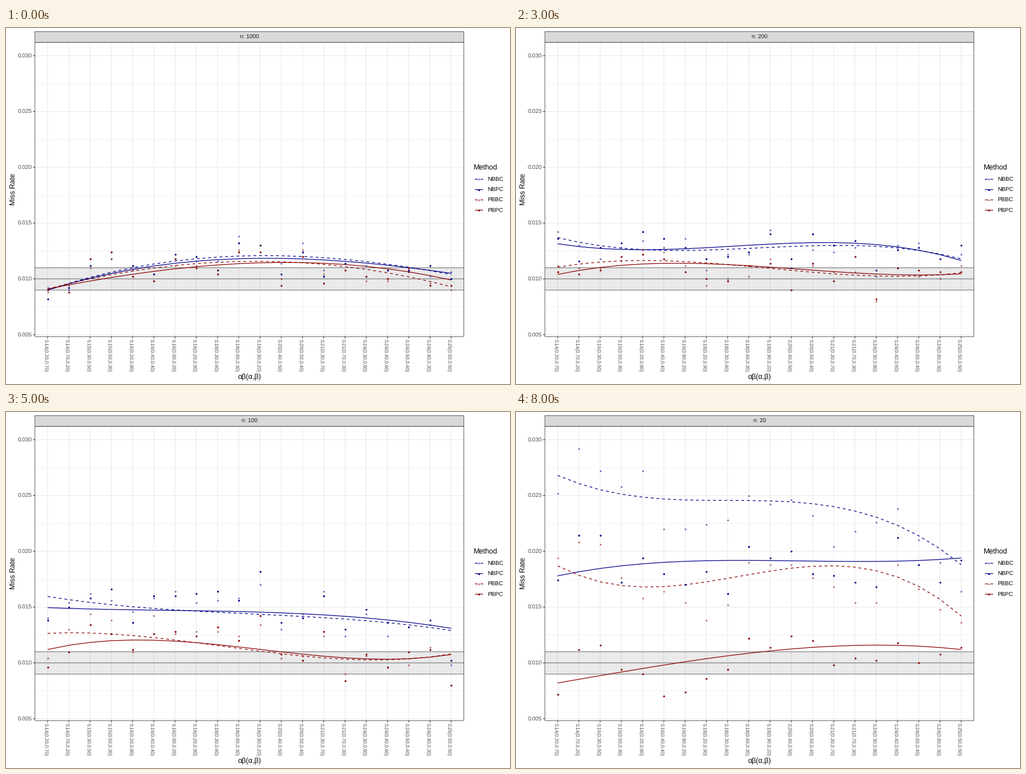
These frames come from a looping animation (890 by 629 pixels, 9000 ms). A matplotlib script:

```python
import numpy as np
import matplotlib.pyplot as plt
from matplotlib.animation import FuncAnimation
from matplotlib.patches import Rectangle

plt.rcParams.update({"font.family": "Liberation Sans", "path.snap": False,
                     "text.hinting": "none"})

W, H, DPI = 890, 629, 64
PT = 72 / DPI                                  # points per pixel
LEFT, RIGHT, TOP, BOTTOM = 51, 808.6, 25.3, 545.2
BLUE, RED = "#00008b", "#8b0000"
METHODS = ["NBBC", "NBPC", "PBBC", "PBPC"]
SIZES = [1000, 500, 250, 200, 150, 100, 75, 50, 20]

CATS = np.arange(1, 21)
PAIRS = sorted(((a, b) for a in range(2, 10) for b in range(2, 10)
                if 14 <= a * b <= 25), key=lambda p: (p[0] * p[1], p[0]))

# Each trend is a cubic through four key heights (unit 0.0001), one per method
KEYS = [1, 7, 14, 20]
TRENDS = {
    1000: [(90, 116, 119, 104), (90, 114, 117, 105),
           (91, 112, 113, 93), (91, 109, 114, 99)],
    250: [(145, 114, 120, 115), (140, 115, 123, 112),
          (116, 109, 101, 112), (116, 106, 104, 107)],
    150: [(129, 137, 140, 121), (123, 139, 142, 121),
          (105, 122, 108, 99), (92, 122, 109, 102)],
    75: [(190, 158, 141, 137), (176, 155, 144, 141),
         (148, 119, 101, 117), (132, 117, 103, 113)],
    50: [(185, 174, 166, 137), (164, 164, 179, 151),
         (137, 122, 112, 87), (119, 113, 115, 103)],
    20: [(268, 246, 240, 188), (178, 191, 191, 194),
         (187, 170, 187, 142), (82, 101, 115, 112)],
}


def px_x(cat):
    return 73.5 + 37.51 * (np.asarray(cat) - 1)


def px_y(units):
    return 443.3 - 1.972 * (np.asarray(units) - 100)


def trends(n):
    """Sizes without keys lie halfway between their neighbours."""
    above = min(k for k in TRENDS if k >= n)
    below = max(k for k in TRENDS if k <= n)
    keys = (np.array(TRENDS[above]) + np.array(TRENDS[below])) / 2
    return [np.polyval(np.polyfit(KEYS, key, 3), CATS) for key in keys]


def make_panel(n):
    """Curves and dots; the methods share most of their scatter."""
    rng = np.random.default_rng(n)
    spread = 8 + 55 / np.sqrt(n)
    shared = rng.normal(0, 0.9 * spread, 20)
    curves = trends(n)
    raw = [c + shared + rng.normal(0, 0.35 * spread, 20) for c in curves]
    return curves, [np.clip(2 * np.round(r / 2), 60, 300) for r in raw]


PANELS = [make_panel(n) for n in SIZES]

fig = plt.figure(figsize=(W / DPI, H / DPI), dpi=DPI, facecolor="white")
ax = fig.add_axes([0, 0, 1, 1])
ax.set(xlim=(0, W), ylim=(H, 0))
ax.axis("off")


def segment(x, y, color, width, z=1, **kw):
    return ax.plot(x, y, color=color, lw=width * PT, zorder=z,
                   solid_capstyle="butt", dash_capstyle="butt", **kw)[0]


def box(x0, y0, x1, y1, z, **kw):
    ax.add_patch(Rectangle((x0, y0), x1 - x0, y1 - y0, zorder=z, **kw))


def label(x, y, s, size, color="black", **kw):
    return ax.text(x, y, s, fontsize=size * PT, color=color, zorder=8,
                   va="baseline", rotation_mode="anchor", **kw)


def method_line(k, x, y):
    style = (0, (4, 4)) if k % 2 == 0 else "-"
    return segment(x, y, BLUE if k < 2 else RED, 1.25, 4, ls=style)


def method_dots(k, x, y):
    return ax.plot(x, y, "o", ms=3.3 * PT, mew=0, zorder=5 + k * 0.1,
                   color=BLUE if k < 2 else RED,
                   alpha=0.5 if k % 2 == 0 else 1)[0]


# Grid, ticks and tick labels
for units in range(75, 300, 50):
    segment([LEFT, RIGHT], [px_y(units)] * 2, "#ebebeb", 0.6)
for units in range(50, 301, 50):
    y = px_y(units)
    segment([LEFT, RIGHT], [y, y], "#ebebeb", 1.2)
    segment([LEFT - 3.2, LEFT], [y, y], "#333333", 1.2)
    label(46, y + 3.6, f"{units / 10000:.3f}", 10.1, "#4d4d4d", ha="right")
for x, (a, b) in zip(px_x(CATS), PAIRS):
    segment([x, x], [TOP, BOTTOM], "#ebebeb", 1.2)
    segment([x, x], [BOTTOM, BOTTOM + 3.2], "#333333", 1.2)
    label(x - 6.2, 550.5, f"{a * b / 100:.2f}({a / 10:.2f},{b / 10:.2f})",
          8.5, "#4d4d4d", rotation=-90, ha="left")

# Tolerance band
box(LEFT, px_y(110), RIGHT, px_y(90), 2, fc="#333333", alpha=0.1, lw=0)
for units in (90, 100, 110):
    segment([LEFT, RIGHT], [px_y(units)] * 2, "#7f7f7f", 1.2, 3)

# Frame, strip and titles
box(LEFT, TOP, RIGHT, BOTTOM, 7, fc="none", ec="#333333", lw=0.8 * PT)
box(LEFT, 6.3, RIGHT, TOP, 7, fc="#d9d9d9", ec="#333333", lw=0.8 * PT)
strip = label(429.8, 19.3, "", 10.1, "#1a1a1a", ha="center")
label(429.8, 620.5, "αβ(α,β)", 12.6, ha="center")
label(15.5, 285.2, "Miss Rate", 12.6, rotation=90, ha="center")

# Legend
label(826, 250, "Method", 12.6, ha="left")
for k, name in enumerate(METHODS):
    y = 267.3 + 18.2 * k
    method_line(k, [828, 842.5], [y, y])
    method_dots(k, [835.3], [y])
    label(850.5, y + 3.6, name, 10.1, ha="left")

lines = [method_line(k, px_x(CATS), px_x(CATS)) for k in range(4)]
dots = [method_dots(k, px_x(CATS), px_x(CATS)) for k in range(4)]


def draw(i):
    strip.set_text(f"n: {SIZES[i]}")
    for line, dot, curve, points in zip(lines, dots, *PANELS[i]):
        line.set_ydata(px_y(curve))
        dot.set_ydata(px_y(points))
    return [strip, *lines, *dots]


anim = FuncAnimation(fig, draw, frames=len(SIZES), init_func=lambda: draw(0),
                     interval=1000, repeat=True, repeat_delay=0)
plt.show()
```
